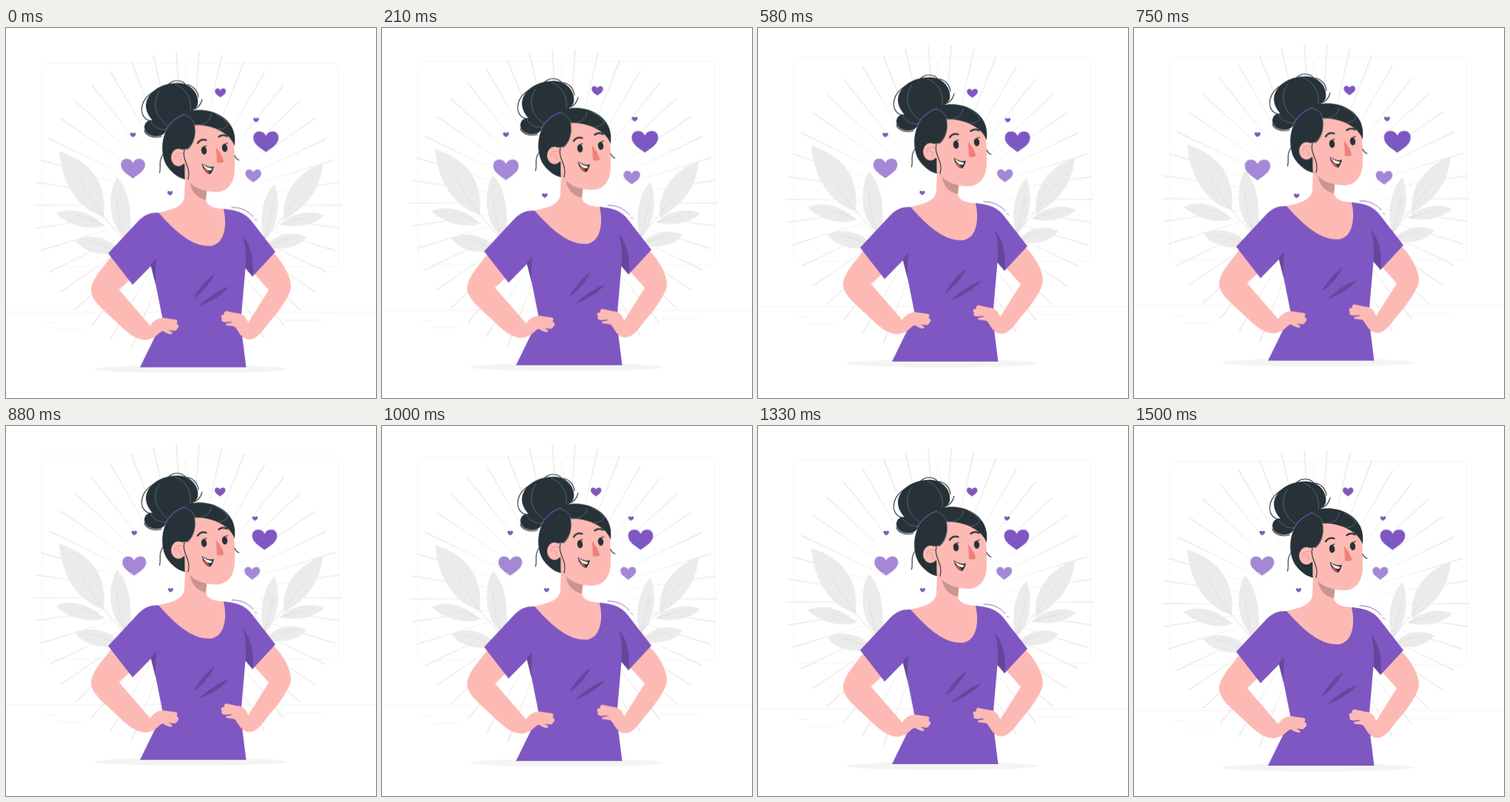
An HTML page for the animation above (1540 ms loop, 500 by 500 pixels).

```html
<!DOCTYPE html>
<html lang="en">
<head>
<meta charset="utf-8">
<title>Confident woman</title>
<style>
html, body { margin: 0; width: 100%; height: 100%; overflow: hidden; background: #fff; }
svg { display: block; width: 100vw; height: 100vh; }
.float { animation: float 1540ms linear infinite; }
.hearts { transform-origin: 261.3px 153px; animation: beat 1540ms linear infinite; }
@keyframes float {
  0%, 100% { transform: translateY(-.5px); }
  46.1% { transform: translateY(-10px); }
  97.4% { transform: translateY(0); }
}
@keyframes beat {
  0%, 100% { transform: scale(1.019); }
  7.1%, 46.1% { transform: scale(1.1); }
  26.6%, 36.4%, 55.8%, 97.4% { transform: scale(1); }
}
.line { fill: none; stroke-linecap: round; stroke-linejoin: round; }
.skin { fill: #fdbab4; }
.shirt { fill: #7e57c2; }
.fold { fill: #65469b; }
.hair { fill: #263238; }
.strand { stroke: #263238; stroke-width: 1.1; }
.shine { stroke: #7d888d; stroke-width: .6; }
</style>
</head>
<body>
<svg viewBox="0 0 500 500" xmlns="http://www.w3.org/2000/svg">
<defs>
  <path id="heart" d="M0 13.600C-4 9.700-16.500 4.300-16.500-5.300C-16.500-10.500-13-13.500-8.700-13.500C-4-13.500-1-10.500 0-7.500C1-10.500 4-13.500 8.700-13.500C13-13.500 16.500-10.500 16.500-5.300C16.500 4.300 4 9.700 0 13.600Z"/>
</defs>
<g class="float">
  <g class="line" stroke="#f5f5f5">
    <rect x="49" y="48.500" width="192.500" height="274.500" rx="5"/>
    <rect x="245" y="48.500" width="204.500" height="274.500" rx="5"/>
    <path d="M0 384.500H500M54 398.500H67M69 408H104M377 395.500H424M432 395.500H436" stroke="#f3f3f3"/>
  </g>
  <g id="rays" fill="#e9e9e9"></g>
  <ellipse cx="249" cy="461.500" rx="131" ry="5.300" fill="#f4f4f4"/>

  <g fill="#ebebeb">
    <path d="M72 167C74 196 87 241 132 256C136 214 120 183 72 167Z"/>
    <path d="M150 202C137 224 137 264 162 287L168 284C170 252 168 222 150 202Z"/>
    <path d="M67 251C84 242 114 247 132 268C112 274 85 268 67 251Z"/>
    <path d="M94 288C112 277 142 284 156 303C134 310 106 305 94 288Z"/>
    <path d="M428 184C397 193 370 224 376 260C399 245 424 226 428 184Z"/>
    <path d="M363 211C346 227 341 264 349 287C368 270 372 237 363 211Z"/>
    <path d="M430 254C412 245 386 251 370 266C388 271 414 269 430 254Z"/>
    <path d="M406 283C386 273 361 280 350 297C370 301 394 299 406 283Z"/>
  </g>
  <g class="line" stroke="#e0e0e0" stroke-width="1">
    <path d="M99 204Q114 238 163 291M150 230Q150 260 163 288M95 254Q118 259 133 267M113 289Q135 293 150 303"/>
    <path d="M405 213Q383 248 348 287M361 238Q356 265 349 285M405 257Q388 260 371 266M386 284Q366 288 352 296"/>
  </g>

  <g class="skin">
    <path d="M146 305C130 325 115 341 115 355C115 368 130 380 145 394C160 408 173 422 188 422C198 422 202 415 208 412L220 408L211 393C204 393 200 397 195 403L152.500 354L176 333Z"/>
    <path d="M360 303C376 318 386 340 385 351C384 362 368 385 355 399C346 411 338 422 328 421.500C318 421 313 410 307 402L318 388C323 390 325 393 327 399L355 354.500L334 331Z"/>
  </g>

  <path class="shirt" d="M206 250C194 250 187 253 179 261L138 305L171 347.500L197 321L211.500 393L204 412L181 459H324.500L318 408V388L323.500 325L333 336.500L364 303L333 263C325 252.500 316 247 295 245Z"/>
  <g class="fold">
    <path d="M203 312L195.500 321L202 347C201 336 202 325 203 312Z"/>
    <path d="M320 282C331 294 335 312 333.500 336L323.500 325C325 310 324 295 320 282Z"/>
    <path d="M282 333C271 340 260 354 253 366C263 360 274 348 282 333Z"/>
    <path d="M301.500 350C289 354 274 364 261 376C275 371 291 362 301.500 350Z"/>
  </g>
  <path class="line" stroke="#7e57c2" stroke-width=".9" d="M305 243C316 242.500 327 247 334 255.500M336.500 259L338.500 261"/>

  <g class="skin">
    <path d="M194 404C199 395 207 391 215 392.500L229 394.500C232 395 232.500 398 230 399.500C233 401 235 405 231 407C231 410 227 410.500 219 408.500C223 411 226 412 224 414C219 415.500 214 410 211 410C207 412 203 417 198 420Z"/>
    <path d="M328 401C325 391 320 386 312 386L298 383C295 383 294 386 295 388C291 387 289 391 292 393C290 395 292 398 296 398C300 398 303 397 306 398C302 400 296 399 297 401.500C299 404 307 402 310 405L318 417Z"/>
    <path d="M243 185L241 228C240 242 224 246 206 250C225 271 250 297 277 295C296 292 299 266 294 245C278 244 270 240 270 231L272 200Z"/>
  </g>
  <path d="M248.500 207L271.500 220L270 233C258 230 249 221 248.500 207Z" fill="#c99590"/>

  <path class="hair" d="M217 138C209 152 209 176 219 189C225 197 233 203 241.500 205L250 180V130Z"/>
  <path class="skin" d="M241 150L254 128L300 133C307 145 310 165 309 190C309 212 298 222 284 222C265 222 252 215 247 207L241.500 203Z"/>
  <path class="hair" d="M216 145C216 132 229 118 247 113C270 107 297 116 306 136C310 146 309.500 152 309 160C306 153 303 149 298 145C286 135 268 131 254.500 131.500C258 147 253 161 241 168L222 178Z"/>
  <ellipse class="skin" cx="233" cy="175.500" rx="10" ry="11.800"/>
  <path class="skin" d="M236 165L245 164V186L239 183Z"/>
  <path class="line" stroke="#ed8f87" stroke-width=".9" d="M239 170C232 168 228 171 228 176M231 174C235 174 237 178 236 182"/>

  <path class="hair" d="M229 75C249 73 262 90 259 104C255 115 235 119 217 138C201 131 189 119 189 105C190 89 206 76 229 75Z"/>
  <path class="hair" d="M195 125C185 127 184 140 194 145C204 149 213 147 217 138C211 130 203 124 195 125Z"/>
  <path class="line" stroke="#7e57c2" stroke-width="1.300" d="M215 139C221 129 230 121 241 117"/>
  <g class="line shine">
    <path d="M208 85C198 98 199 119 218 132M229 77C245 83 251 99 249 112M195 125C197 132 204 137 214 138"/>
    <path d="M241 118C254 121 258 133 255 146C253 155 249 161 243 165M277 117C277 126 268 132 256 132M284 117C294 121 298 127 300 131C296 136 289 138 287 137"/>
  </g>
  <g class="line strand">
    <path d="M212 84C191 85 181 102 184 116C186 122 190 125 195 126M210 83C218 75 226 77 231 79M219 77C227 69 238 71 243 77C251 77 259 84 260 94M265 97C263 105 259 110 251 111"/>
    <path d="M187 139C189 147 202 150 210 147M213 170C205 180 210 188 207.500 196M241 165C237 180 251 188 246 205M309 173Q311 178 315 179"/>
  </g>

  <g class="hair">
    <ellipse cx="267.500" cy="166" rx="3.700" ry="5.400" transform="rotate(-8 267.500 166)"/>
    <ellipse cx="295.500" cy="162.700" rx="3.700" ry="5.400" transform="rotate(-8 295.500 162.700)"/>
  </g>
  <path class="line strand" d="M267 161L271 159.500M295 157.500L299.500 156"/>
  <path class="line" stroke="#263238" stroke-width="2.300" d="M259 156C262 151.500 266 150.500 270.500 152M287.500 147.500C291 145 295 145 298.500 146.700"/>
  <path d="M284 162C289 168 293 175 294.500 181C291 183 288 183 285 182Z" fill="#f0807a"/>
  <path class="hair" d="M264.500 183.500C270 187 275 189.500 281 187.500C280 192 278 196 276 198C270 197 266 192 264.500 183.500Z"/>
  <path d="M265.500 184.500C269 187.500 274 190 278.500 190L277 193C272 193 268 190.500 265.500 184.500Z" fill="#fff"/>
  <path d="M266.500 190C268 193.500 271 196 275 197C274 193.500 271 191 266.500 190Z" fill="#e0533f"/>
</g>
<g class="hearts" id="hearts"></g>
</svg>
<script>
const add = (id, tag, attrs) => {
  const el = document.createElementNS('http://www.w3.org/2000/svg', tag);
  for (const k in attrs) el.setAttribute(k, attrs[k]);
  document.getElementById(id).append(el);
};

const rays = 42;
for (let i = 0; i < rays; i++) {
  add('rays', 'path', {
    d: 'M62 0L208 -.8V.8Z',
    transform: `translate(245.5 240) rotate(${i * 360 / rays})`
  });
}

// x, y, width, colour
const dark = '#7e57c2', light = '#a588d5';
[
  [349.5, 153.7, 33.5, dark],
  [173.3, 189.3, 32, light],
  [332.8, 199, 21, light],
  [289.2, 89, 14.5, dark],
  [336.5, 125, 7.5, dark],
  [173.3, 144.7, 7.5, dark],
  [222.5, 222, 7, dark]
].forEach(([x, y, w, fill]) => add('hearts', 'use', {
  href: '#heart', fill, transform: `translate(${x} ${y}) scale(${w / 33})`
}));
</script>
</body>
</html>
```
